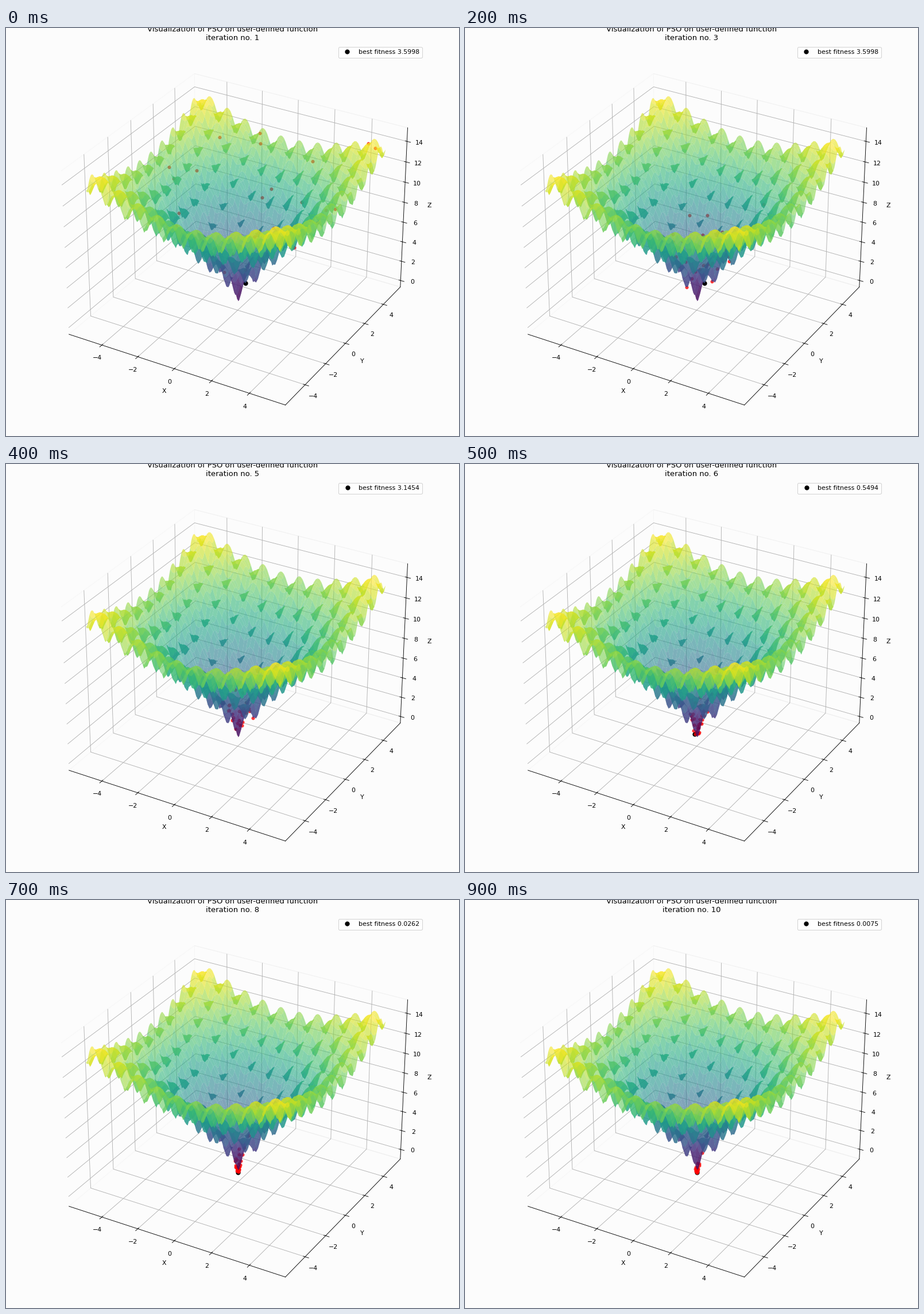
Animation of 789 by 710 pixels, one loop 1000 ms. Source, as a matplotlib script:

```python
import numpy as np
import matplotlib.pyplot as plt
from matplotlib.animation import FuncAnimation

WIDTH, HEIGHT = 789, 710
BOUND = 5.12
MARGIN = 0.05 + 1.1 / 48  # autoscale padding plus the 3D view margin
PARTICLES = 30
PAPER = "#fcfcfc"

# First iteration of each new best: fitness and location
BEST = {
    1: (3.5998, (0.97, -0.97)),
    4: (3.1454, (-0.95, 0.15)),
    6: (0.5494, (-0.09, -0.04)),
    7: (0.0262, (0, 0)),
    9: (0.0075, (0, 0)),
}


def ackley(x, y):
    hollow = -20 * np.exp(-0.2 * np.sqrt((x**2 + y**2) / 2))
    ripple = -np.exp((np.cos(2 * np.pi * x) + np.cos(2 * np.pi * y)) / 2)
    return hollow + ripple + 20 + np.e


def padded(low, high):
    pad = MARGIN * (high - low)
    return low - pad, high + pad


def best_at(iteration):
    return BEST[max(k for k in BEST if k <= iteration)]


rng = np.random.default_rng(4)
start = rng.uniform(-BOUND, BOUND, (2, PARTICLES))
shrink = rng.uniform(0.5, 0.72, PARTICLES)


def swarm_at(iteration):
    """Each particle closes in on the minimum at its own rate."""
    x, y = start * shrink ** (iteration - 1)
    return x, y, ackley(x, y)


fig = plt.figure(figsize=(10, 9), dpi=78.9, facecolor=PAPER)
ax = fig.add_axes([59 / WIDTH, 11.5 / HEIGHT, 671 / WIDTH, 671 / HEIGHT],
                  projection="3d", computed_zorder=False, facecolor=PAPER)
ax.view_init(elev=30, azim=-60)

steps = np.linspace(-BOUND, BOUND, 100)
X, Y = np.meshgrid(steps, steps)
Z = ackley(X, Y)
ax.plot_surface(X, Y, Z, cmap="viridis", alpha=0.6, linewidth=0,
                antialiased=True, zorder=4)


def add_dots(color, size, zorder, **style):
    dots, = ax.plot([0], [0], [0], "o", color=color, ms=size, mew=1.5,
                    zorder=zorder, **style)
    return dots


best_dot = add_dots("black", 6, 2, label="best fitness 0.0000")
swarm_dots = add_dots("red", 4, 3, alpha=0.7)
legend = ax.legend(handles=[best_dot], loc="upper right")
title = fig.text(0.5, 1 - 21 / HEIGHT, "", fontsize=12, ha="center",
                 va="baseline")

ax.set(xlabel="X", ylabel="Y", zlabel="Z",
       xlim=padded(-BOUND, BOUND), ylim=padded(-BOUND, BOUND))
for axis in (ax.xaxis, ax.yaxis, ax.zaxis):
    axis.pane.fill = False


def draw(frame):
    iteration = frame + 1
    fitness, (x, y) = best_at(iteration)
    ax.set_zlim(*padded(min(Z.min(), fitness), Z.max()))
    best_dot.set_data_3d([x], [y], [fitness])
    swarm_dots.set_data_3d(*swarm_at(iteration))
    legend.get_texts()[0].set_text(f"best fitness {fitness:.4f}")
    title.set_text("Visualization of PSO on user-defined function\n"
                   f"iteration no. {iteration}")
    return best_dot, swarm_dots, title


anim = FuncAnimation(fig, draw, frames=10, interval=100,
                     init_func=lambda: draw(0), repeat=True)
plt.show()
```
